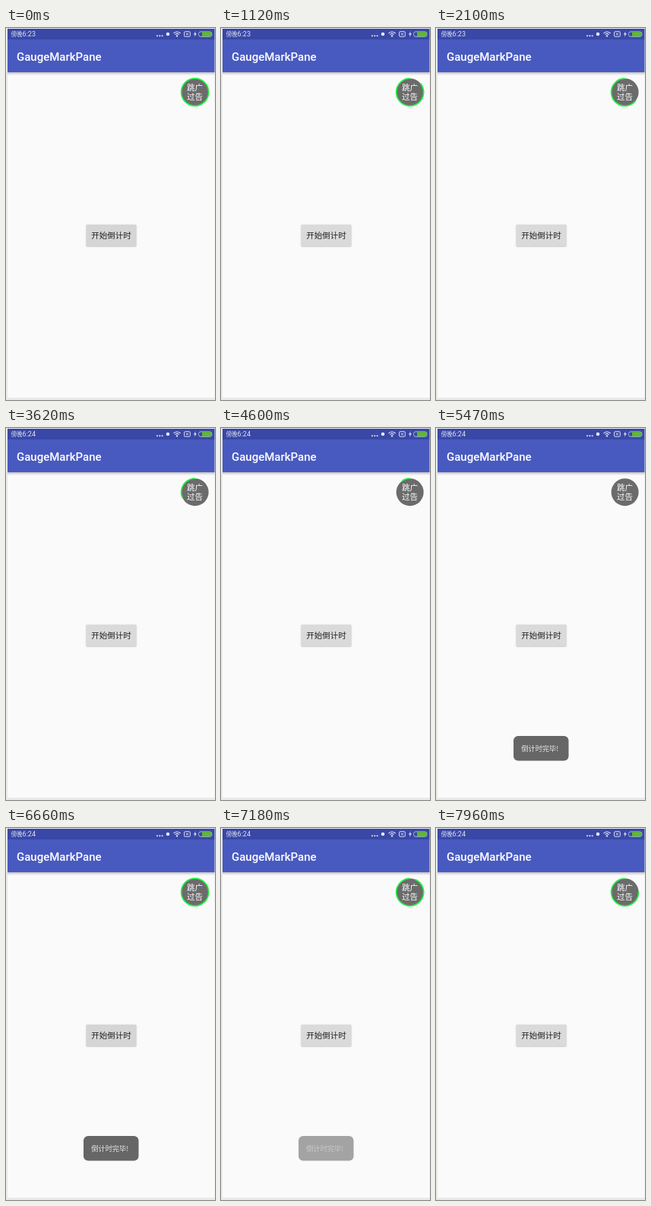
Write an HTML page with a canvas that moves like this. It is 275 px wide and 488 px high and loops after 8 s.

```html
<!DOCTYPE html>
<html lang="zh-CN">
<head>
<meta charset="utf-8">
<title>Countdown ring</title>
<style>
  html, body { margin: 0; width: 100%; height: 100%; overflow: hidden; background: #e9e9e9; }
  canvas { display: block; width: 275px; height: 488px; }
</style>
</head>
<body>
<canvas id="stage"></canvas>
<script>
const W = 275, H = 488, LOOP = 8000;
const TICK = 58.1, TICKS = 79;
const CJK = '"Noto Sans CJK SC", "Noto Sans CJK", sans-serif';
const LATIN = 'Roboto, sans-serif';

const canvas = document.getElementById('stage');
const ctx = canvas.getContext('2d');
const dpr = window.devicePixelRatio || 1;
canvas.width = Math.round(W * dpr);
canvas.height = Math.round(H * dpr);
ctx.scale(dpr, dpr);

const ramp = (t, a, b) => Math.min(1, Math.max(0, (t - a) / (b - a)));

function rect(x, y, w, h, color) {
  ctx.fillStyle = color;
  ctx.fillRect(x, y, w, h);
}

function roundRect(x, y, w, h, r) {
  ctx.beginPath();
  ctx.roundRect(x, y, w, h, r);
}

function disc(x, y, r, color) {
  ctx.beginPath();
  ctx.arc(x, y, r, 0, Math.PI * 2);
  ctx.fillStyle = color;
  ctx.fill();
}

function text(str, x, y, font, color, align = 'left') {
  ctx.font = font;
  ctx.fillStyle = color;
  ctx.textAlign = align;
  ctx.fillText(str, x, y);
}

function line(points, width, color) {
  ctx.beginPath();
  points.forEach(([x, y], i) => i ? ctx.lineTo(x, y) : ctx.moveTo(x, y));
  ctx.lineWidth = width;
  ctx.strokeStyle = color;
  ctx.stroke();
}

function drawStatusIcons() {
  const ink = '#e4e7f6';
  for (const x of [199, 202.3, 205.6]) disc(x, 10.2, 1.05, ink);
  disc(213, 8, 2.3, ink);

  // wifi
  ctx.strokeStyle = ink;
  ctx.lineWidth = 1.1;
  for (const r of [3.4, 6]) {
    ctx.beginPath();
    ctx.arc(225, 11, r, -Math.PI * 0.77, -Math.PI * 0.23);
    ctx.stroke();
  }
  disc(225, 10.4, 1.2, ink);

  // missing SIM
  roundRect(234.5, 4.7, 7.8, 6.6, 1.2);
  ctx.lineWidth = 0.9;
  ctx.stroke();
  line([[236.9, 6.5], [239.9, 9.5]], 0.9, ink);
  line([[239.9, 6.5], [236.9, 9.5]], 0.9, ink);

  // charging bolt
  ctx.beginPath();
  ctx.moveTo(249.7, 4.2);
  ctx.lineTo(246.8, 8.5);
  ctx.lineTo(248.7, 8.5);
  ctx.lineTo(247.9, 11.8);
  ctx.lineTo(250.9, 7.3);
  ctx.lineTo(249, 7.3);
  ctx.fillStyle = ink;
  ctx.fill();

  // battery
  roundRect(253.5, 4.9, 17.4, 6.4, 2.6);
  ctx.strokeStyle = '#b9c0df';
  ctx.lineWidth = 0.9;
  ctx.stroke();
  roundRect(258, 5.2, 12.7, 5.8, [0.5, 2.4, 2.4, 0.5]);
  ctx.fillStyle = '#5dbb2b';
  ctx.fill();
}

function drawChrome(t) {
  rect(0, 0, W, H, '#e9e9e9');
  rect(2, 1, 272.5, 484, '#fafafa');

  const shade = ctx.createLinearGradient(0, 58, 0, 62);
  shade.addColorStop(0, 'rgba(0,0,0,.24)');
  shade.addColorStop(1, 'rgba(0,0,0,0)');
  rect(2, 58, 272.5, 4, shade);

  rect(2, 1, 272.5, 14, '#3947a6');
  rect(2, 15, 272.5, 43, '#485abf');

  text('傍晚', 6.5, 11, `7.5px ${CJK}`, '#e4e7f6');
  text(t < 3330 ? '6:23' : '6:24', 21.6, 11.2, `9px ${LATIN}`, '#e4e7f6');
  drawStatusIcons();
  text('GaugeMarkPane', 14, 42.5, `500 15px ${LATIN}`, '#fff');
}

function drawButton(t) {
  const press = t < 6000
    ? 1 - ramp(t, 470, 700)
    : ramp(t, 6430, 6660) - ramp(t, 6840, 7070);
  const v = 218 - 5 * press;

  ctx.save();
  ctx.shadowColor = 'rgba(0,0,0,.28)';
  ctx.shadowBlur = 1.6 * dpr;
  ctx.shadowOffsetY = 0.6 * dpr;
  roundRect(105.7, 258, 65.6, 28.2, 1);
  ctx.fillStyle = `rgb(${v},${v},${v})`;
  ctx.fill();
  ctx.restore();
  text('开始倒计时', 138.5, 275.8, `10.5px ${CJK}`, '#222', 'center');
}

// Share of the ring already wiped away, clockwise from the top
function ringGone(t) {
  const start = t < 6600 ? 470 : 6840;
  return Math.min(1, Math.max(0, Math.floor((t - start) / TICK + 0.01)) / TICKS);
}

function drawCounter(t) {
  const x = 248.6, y = 84.2, top = -Math.PI / 2;
  const gone = ringGone(t);
  disc(x, y, 18, '#6b6b6b');
  if (gone < 1) {
    ctx.beginPath();
    ctx.arc(x, y, 18, top + gone * Math.PI * 2, top + Math.PI * 2);
    ctx.lineWidth = 1.7;
    ctx.strokeStyle = '#22f244';
    ctx.stroke();
  }
  text('跳广', x, 81.7, `10.5px ${CJK}`, '#fff', 'center');
  text('过告', x, 94.2, `10.5px ${CJK}`, '#fff', 'center');
}

function drawToast(t) {
  if (t < 5240 || t > 7320) return;
  const rise = ramp(t, 5240, 5470);
  // rises past its resting place, then settles
  const y = 404 + 3 * (1 - rise) - 6.2 * Math.sin(Math.PI * rise);
  ctx.save();
  ctx.globalAlpha = (0.74 + 0.26 * ramp(t, 5240, 5360)) * (1 - ramp(t, 7080, 7320));
  roundRect(102, y, 72.5, 32.6, 6);
  ctx.fillStyle = '#666';
  ctx.fill();
  text('倒计时完毕!', 112.3, y + 19.8, `9.2px ${CJK}`, '#e8e8e8');
  ctx.restore();
}

function frame(now) {
  const t = now % LOOP;
  drawChrome(t);
  drawButton(t);
  drawCounter(t);
  drawToast(t);
  requestAnimationFrame(frame);
}

let origin;
requestAnimationFrame(function begin(now) {
  origin = now;
  frame(0);
});
</script>
</body>
</html>
```
